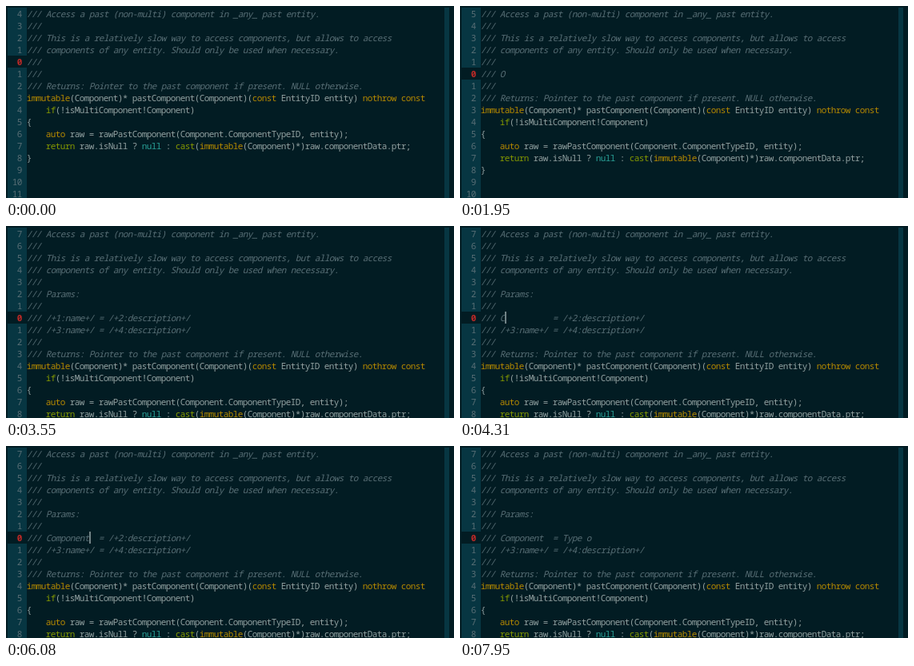
An HTML page with a canvas that plays this animation: 560 px wide and 240 px high, repeating every 7.99 s.

```html
<!DOCTYPE html>
<html lang="en">
<head>
<meta charset="utf-8">
<title>Editor snippet</title>
<style>
  html, body { margin: 0; height: 100%; overflow: hidden; background: #021c23; }
  canvas { display: block; }
</style>
</head>
<body>
<canvas id="stage" width="560" height="240"></canvas>
<script>
const ctx = document.getElementById('stage').getContext('2d');
const LOOP = 7990, CELL = 6, ROW = 15, TOP = 2, LEFT = 26;
const FONT = '11px "Noto Sans Mono", monospace';
const BG = '#021c23', GUTTER = '#073642', COMMENT = '#586e75', TEXT = '#93a1a1';
const YELLOW = '#b58900', GREEN = '#859900', CYAN = '#2aa198', RED = '#c02a27';
const KEYWORDS = {
  immutable: YELLOW, const: YELLOW, nothrow: YELLOW, auto: YELLOW,
  if: GREEN, return: GREEN, cast: GREEN, null: CYAN
};

const before = [
  '/// Access a past (non-multi) component in _any_ past entity.',
  '///',
  '/// This is a relatively slow way to access components, but allows to access',
  '/// components of any entity. Should only be used when necessary.'
];
const after = [
  '///',
  '/// Returns: Pointer to the past component if present. NULL otherwise.',
  'immutable(Component)* pastComponent(Component)(const EntityID entity) nothrow const',
  '    if(!isMultiComponent!Component)',
  '{',
  '    auto raw = rawPastComponent(Component.ComponentTypeID, entity);',
  '    return raw.isNull ? null : cast(immutable(Component)*)raw.componentData.ptr;',
  '}'
];

// The name column is padded; a fresh key briefly pushes the rest one cell right.
const param = (name, width = 11) => '/// ' + name.padEnd(width) + '= /+2:description+/';
const typed = s => '/// Component  = ' + s;

// Current line over time: [ms, text, cursor column, selection start, selection end]
const steps = [
  [0, '///'], [90, '///', 3],
  [810, '//'], [850, '//', 2],
  [1250, '///'], [1290, '///', 3],
  [1430, '/// '], [1470, '/// ', 4],
  [1950, '/// O'], [1990, '/// O', 5],
  [2320, '/// '], [2360, '/// ', 4],
  [2570, '/// P'], [2610, '/// P', 5],
  [2700, '/// Pa', 6], [2820, '/// Par'], [2860, '/// Par', 7],
  [3250, '/// Par2'], [3290, '/// Par2', 8],
  [3550, param('/+1:name+/')], [3590, param('/+1:name+/'), -1, 4, 14],
  [4270, param('C', 12), 5], [4310, param('C'), 5],
  [4560, param('Co', 12), 6], [4600, param('Co'), 6],
  [4770, param('Com', 12), 7], [4810, param('Com'), 7],
  [4940, param('Comp', 12), 8], [4980, param('Compo'), 9],
  [5270, param('Compon'), 10],
  [5410, param('Compone', 12), 11], [5450, param('Compone'), 11],
  [5580, param('Componen', 12), 12], [5620, param('Componen'), 12],
  [6080, param('Component'), 13], [6160, param('Component'), -1, 17, 34],
  [7050, typed('T')], [7090, typed('T'), 18],
  [7480, typed('Ty')], [7520, typed('Ty'), 19],
  [7600, typed('Typ'), 20], [7690, typed('Type'), 21], [7770, typed('Type '), 22],
  [7950, typed('Type o')]
];

function buffer(t, line) {
  if (t < 810) return { lines: [...before, line, ...after], row: 4 };
  if (t < 3550) return { lines: [...before, '///', line, ...after], row: 5 };
  return {
    lines: [...before, '///', '/// Params:', '///', line, '/// /+3:name+/ = /+4:description+/', ...after],
    row: 7
  };
}

function rect(color, x, y, w, h) {
  ctx.fillStyle = color;
  ctx.fillRect(x, y, w, h);
}

function print(str, x, y, color, style = '') {
  ctx.font = style + ' ' + FONT;
  ctx.fillStyle = color;
  [...str].forEach((ch, i) => ctx.fillText(ch, x + CELL * (i + 0.5), y + 12));
}

function printCode(line, y) {
  if (line.startsWith('//')) return print(line, LEFT, y, COMMENT, 'italic');
  for (const m of line.matchAll(/\w+|[^\w\s]+/g)) {
    print(m[0], LEFT + CELL * m.index, y, KEYWORDS[m[0]] || TEXT);
  }
}

function draw(t) {
  const [, line, cursor = -1, from, to] = steps.findLast(s => s[0] <= t);
  const { lines, row } = buffer(t, line);
  const rowTop = TOP + ROW * row;

  rect(BG, 0, 0, 560, 240);
  rect(GUTTER, 2, TOP, 24, 238);
  rect(GUTTER, 548, TOP, 6, 238);
  rect(BG, 2, rowTop, 24, ROW);
  ctx.textAlign = 'center';

  for (let r = 0; r < 16; r++) {
    const y = TOP + ROW * r, label = String(Math.abs(r - row));
    print(label, 20 - CELL * label.length, y, r === row ? RED : COMMENT, r === row ? 'bold' : '');
    printCode(lines[r] || '', y);
  }
  if (to) {
    const x = LEFT + CELL * from;
    rect(COMMENT, x, rowTop, CELL * (to - from), ROW);
    print(line.slice(from, to), x, rowTop, BG, 'italic');
  }
  if (cursor >= 0) rect('#718386', LEFT + CELL * cursor, rowTop, 2, ROW);
}

const start = performance.now();
function tick() {
  draw((performance.now() - start) % LOOP);
  requestAnimationFrame(tick);
}
tick();
</script>
</body>
</html>
```
